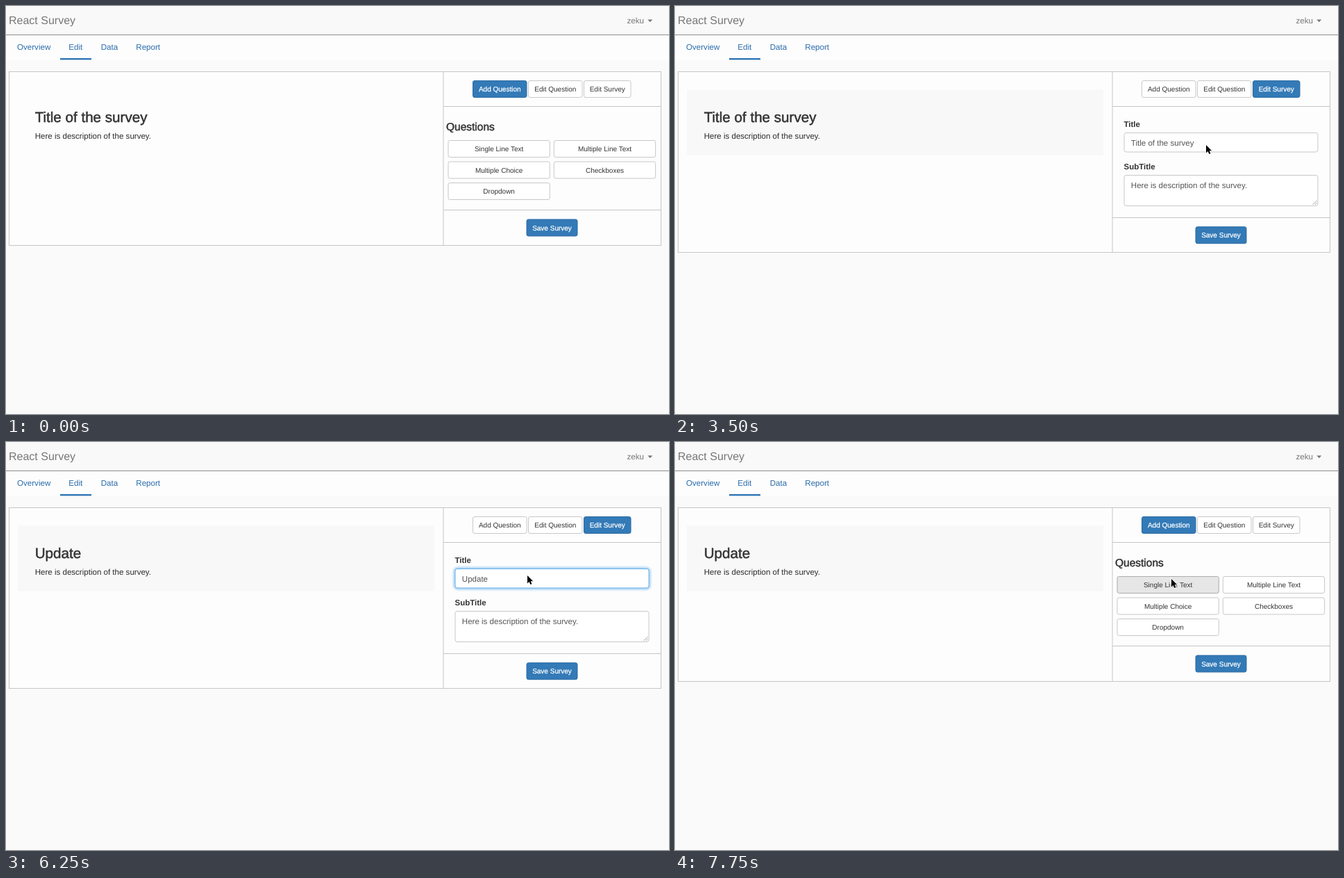
Write an HTML page that moves like this. It is 955 px wide and 587 px high and loops after 8 s.

```html
<!DOCTYPE html>
<html lang="en">
<head>
<meta charset="utf-8">
<title>Survey editor</title>
<style>
html, body { margin: 0; width: 100%; height: 100%; overflow: hidden; background: #fafafa; }
svg { display: block; font-family: "Liberation Sans", sans-serif; }
text { fill: #333; white-space: pre; text-rendering: geometricPrecision; }
.link { font-size: 11.6px; fill: #2a6cab; }
.body { font-size: 11.55px; fill: #2b2b2b; }
.value { font-size: 11.55px; fill: #555; }
.label { font-size: 11.5px; font-weight: bold; }
.head { stroke: #333; stroke-width: .5px; }
.line { stroke: #c6c6c6; fill: none; }
.box { fill: #fff; stroke: #c8c8c8; }
.btn rect { fill: #fff; stroke: #c8c8c8; }
.btn text { font-size: 10px; text-anchor: middle; }
.btn.hover rect { fill: #e6e6e6; stroke: #adadad; }
.btn.primary rect { fill: #337ab7; stroke: #2e6da4; }
.btn.primary text { fill: #fff; stroke: #fff; stroke-width: .25px; }
</style>
</head>
<body>
<svg id="stage" width="955" height="587" viewBox="0 0 955 587"></svg>
<script>
const LOOP = 8000;
const stage = document.getElementById("stage");

const text = (x, y, str, cls, extra = "") =>
  `<text x="${x}" y="${y}" class="${cls}" ${extra}>${str}</text>`;
const rect = (x, y, w, h, extra) =>
  `<rect x="${x}" y="${y}" width="${w}" height="${h}" ${extra}/>`;
const button = (x, y, w, label, id, cls = "") =>
  `<g id="${id}" class="btn ${cls}">${rect(x, y, w, 24, 'rx="2.5"')}` +
  `<text x="${x + w / 2}" y="${y + 15.5}">${label}</text></g>`;

const types = ["Single Line Text", "Multiple Line Text", "Multiple Choice", "Checkboxes", "Dropdown"];
const typeButtons = types.map((label, i) =>
  button(637 + (i % 2) * 152.3, 193.5 + (i >> 1) * 30.5, 146.3, label, "type" + i)).join("");

stage.innerHTML = `
  <defs><filter id="blur" x="-5%" y="-40%" width="110%" height="180%">
    <feGaussianBlur stdDeviation="1.8"/></filter></defs>
  ${rect(0, 0, 955, 587, 'fill="#fafafa"')}
  ${rect(0, 0, 955, 41, 'fill="#f9f9f9"')}
  ${rect(0, 41, 955, 1, 'fill="#8c8c8c"')}
  ${rect(0, 42, 955, 36, 'fill="#fdfdfd"')}
  ${text(4, 25.5, "React Survey", "", 'style="font-size:16px;fill:#777"')}
  ${text(894.5, 24.5, "zeku", "", 'style="font-size:11.6px;fill:#777"')}
  <path d="M924.3 19.6h7l-3.5 3.6z" fill="#777"/>
  ${text(16, 63, "Overview", "link")}
  ${text(90.3, 63, "Edit", "link")}
  ${text(136.7, 63, "Data", "link")}
  ${text(187.3, 63, "Report", "link")}
  ${rect(78, 75, 45, 2.4, 'fill="#2f76b5"')}
  <rect id="frame" x="4.5" y="94.5" width="939" fill="#fdfdfd" stroke="#c6c6c6"/>
  ${rect(17, 120.5, 600, 94, 'id="shade" fill="#f8f8f8"')}
  ${text(41.7, 167, "", "head", 'id="title" style="font-size:20.6px"')}
  ${text(41.7, 190.5, "Here is description of the survey.", "body")}
  <path id="rules" class="line"/>
  ${button(672.5, 107.5, 77.5, "Add Question", "add")}
  ${button(752.5, 107.5, 77.5, "Edit Question", "question")}
  ${button(832.5, 107.5, 67.5, "Edit Survey", "survey")}
  <g id="addPanel">
    ${text(634, 179, "Questions", "head", 'style="font-size:15.5px"')}
    ${typeButtons}
  </g>
  <g id="editPanel">
    ${text(646.5, 174, "Title", "label")}
    ${rect(646.5, 182, 280, 28.5, 'id="glow" rx="4" fill="none" stroke="#66afe9" stroke-width="4" filter="url(#blur)"')}
    ${rect(647, 182.5, 279, 27.5, 'id="input" class="box" rx="3"')}
    ${rect(657, 190, 91, 13, 'id="selection" fill="#b3d7fd"')}
    ${text(656.8, 200.5, "", "value", 'id="field"')}
    ${rect(0, 190, 1, 13, 'id="caret" fill="#333"')}
    ${text(646.5, 235, "SubTitle", "label")}
    ${rect(647, 243.5, 279, 44, 'class="box" rx="3"')}
    ${text(656.8, 261.5, "Here is description of the survey.", "value")}
    <path d="M918.5 286l6-6M921.7 286l2.8-2.8" stroke="#888" stroke-width=".8"/>
  </g>
  <g id="save">${button(750, 307, 73, "Save Survey", "saveButton", "primary")}</g>
  <path id="pointer" d="M0 0V11.4L2.6 9L4.4 13.1L6.4 12.2L4.7 8.2H8.2Z"
    fill="#000" stroke="#fff" stroke-width="1.4" paint-order="stroke"/>`;

const el = id => document.getElementById(id);
const show = (id, on) => el(id).setAttribute("visibility", on ? "inherit" : "hidden");
const set = (id, attrs) => {
  for (const k in attrs) el(id).setAttribute(k, attrs[k]);
};
const between = (t, a, b) => t >= a && t < b;
const latest = (steps, t) => steps.filter(s => s[0] <= t).pop();

// time, x, y: the screen refreshes in quarter seconds, so the pointer jumps
const pointerSteps = [
  [1000, 291, 10], [1250, 142, 162], [1500, 144, 163.5], [3000, 643, 149],
  [3250, 702, 185], [3500, 765, 200], [3750, 751, 192], [6500, 894, 159],
  [6750, 796, 128], [7000, 726, 122], [7500, 719, 145], [7750, 715, 197]
];
const typing = [
  [0, "Title of the survey"], [4750, "U"], [5000, "Up"], [5250, "Upda"],
  [5500, "Update"], [5750, "Update "]
];
const caretOn = [[3750, 4250], [4750, 6250], [6750, 7250]];

function setMode(editing, t) {
  const rule = editing ? 304.5 : 293.5;
  const bottom = editing ? 354.5 : 344.5;
  set("frame", { height: bottom - 94.5 });
  set("rules", { d: `M630 94.5V${bottom}M630 144.5H943.5M630 ${rule}H943.5` });
  set("save", { transform: `translate(0 ${editing ? 10.7 : 0})` });
  show("addPanel", !editing);
  show("editPanel", editing);
  const hoverAdd = between(t, 7000, 7250);
  const hoverQuestion = between(t, 6750, 7000);
  set("add", { class: "btn " + (!editing ? "primary" : hoverAdd ? "hover" : "") });
  set("question", { class: "btn " + (hoverQuestion ? "hover" : "") });
  set("survey", { class: "btn " + (editing ? "primary" : "") });
  set("type0", { class: "btn " + (t >= 7750 ? "hover" : "") });
}

function draw(t) {
  const editing = between(t, 2750, 7250);
  setMode(editing, t);
  show("shade", t >= 2750);

  const value = latest(typing, t)[1];
  el("title").textContent = value;
  el("field").textContent = value;

  const focus = t < 3750 ? 0 : t < 4000 ? 0.6 : 1;
  set("glow", { opacity: focus * 0.6 });
  el("input").style.stroke = focus ? "#66afe9" : "";
  show("selection", editing && between(t, 4500, 4750));
  show("caret", editing && caretOn.some(([a, b]) => between(t, a, b)));
  if (editing) set("caret", { x: Math.round(656.8 + el("field").getComputedTextLength()) });

  const at = latest(pointerSteps, t);
  show("pointer", !!at);
  if (at) set("pointer", { transform: `translate(${at[1]} ${at[2]})` });
}

const start = performance.now();
function tick() {
  draw((performance.now() - start) % LOOP);
  requestAnimationFrame(tick);
}
tick();
</script>
</body>
</html>
```
